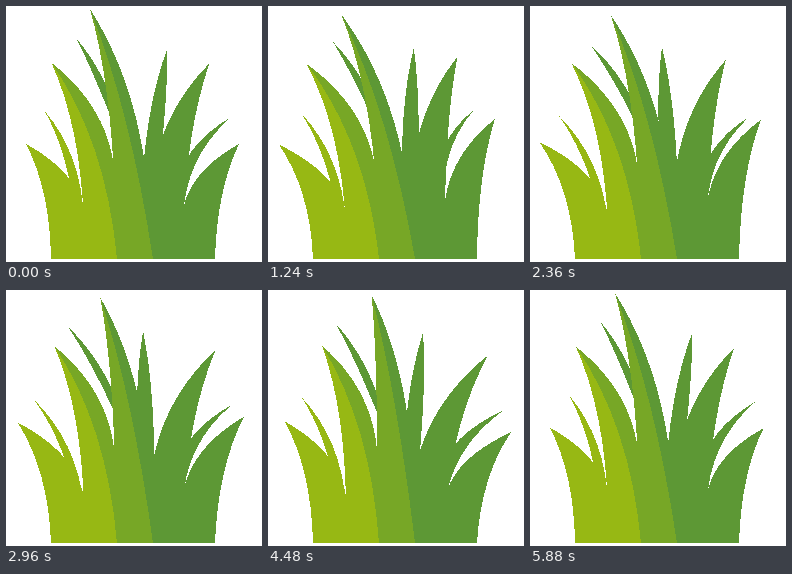
Write an HTML page that moves like this. It is 256 by 256 pixels and loops after 5.96 s.

```html
<!DOCTYPE html>
<html>
<head>
<meta charset="utf-8">
<style>
html, body { margin: 0; width: 100%; height: 100%; overflow: hidden; background: #fff; }
svg { display: block; width: 100vw; height: 100vh; }
</style>
</head>
<body>
<svg id="stage" viewBox="0 0 256 256" shape-rendering="crispEdges"></svg>
<script>
const LOOP = 5960, STEP = 40, GROUND = 253;
const LEFT = 1800, RIGHT = 3780; // when the gust turns
const GREEN = '#5d9835', MID = '#77a726', LIME = '#97b814';

// keys: turning points of the tip (time, x, y), joined at constant speed.
// Edges: foot x, foot y, x the edge bends towards.
// give: how much of the tip's sway the bend follows.
const back = {
  keys: [[2330, 60, 38.5], [5600, 72, 31.5]], give: .4,
  left: [112, 130, 90], right: [115, 122, 101], floor: 130
};
const thinRight = {
  keys: [[2440, 131, 41], [5490, 167, 43]], give: .5,
  left: [135, 200, 138], right: [148, 200, 162]
};
const right = {
  keys: [[LEFT, 183, 48], [RIGHT, 228, 69]], give: .3,
  left: [143, 210, 143], right: [177, 220, 181]
};
const side = {
  keys: [[0, 225, 111], [1200, 205, 104], [4100, 239, 122]], give: .5,
  left: [170, 185, 175], right: [177, 215, 178]
};
const farRight = {
  keys: [[0, 233, 138], [LEFT, 224, 102], [RIGHT, 248, 144]], give: .2,
  left: [176, 220, 174], right: [209, 253, 211]
};
const tall = {
  keys: [[0, 84, 3], [LEFT, 68, 10], [RIGHT, 113, 6]], give: .25,
  left: [109, 190, 105], right: [144, 250, 147], inner: [147, 253, 124]
};
const thinLeft = {
  keys: [[2700, 27, 110], [5900, 39, 105]], give: .5,
  left: [68, 200, 60], right: [78, 215, 76]
};
const left = {
  keys: [[LEFT, 35, 58], [RIGHT, 58, 55]], give: .3,
  left: [78, 220, 75], right: [109, 190, 113], inner: [111, 253, 100]
};
const farLeft = {
  keys: [[0, 20, 138], [LEFT, 7, 139], [RIGHT, 15, 128]], give: .2,
  left: [45, 253, 44], right: [79, 220, 80]
};

// Back to front
const layers = [
  [back, GREEN], [thinRight, GREEN], [right, GREEN], [side, GREEN], [farRight, GREEN],
  [tall, GREEN], [tall, MID, 'inner'],
  [thinLeft, LIME], [left, MID], [farLeft, LIME], [left, LIME, 'inner']
].map(([blade, fill, edge = 'right']) => {
  const path = document.createElementNS('http://www.w3.org/2000/svg', 'path');
  path.setAttribute('fill', fill);
  stage.append(path);
  return { blade, edge, path };
});

function tipAt(keys, t) {
  const next = keys.findIndex(([time]) => time > t);
  const b = keys[Math.max(next, 0)];
  const a = keys.at(next > 0 ? next - 1 : -1);
  const since = (t - a[0] + LOOP) % LOOP, span = (b[0] - a[0] + LOOP) % LOOP;
  return [1, 2].map(i => a[i] + (b[i] - a[i]) * since / span);
}

function outline(blade, edge, t) {
  const { keys, give, floor = GROUND } = blade;
  const [x, y] = tipAt(keys, t), dx = x - tipAt(keys, 0)[0];
  const bend = ([, footY, bendX]) => `${bendX + give * dx} ${y + .4 * (footY - y)}`;
  const l = blade.left, r = blade[edge];
  return `M${x} ${y}Q${bend(r)} ${r[0]} ${r[1]}V${floor}H${l[0]}V${l[1]}Q${bend(l)} ${x} ${y}Z`;
}

function draw() {
  const t = Math.floor(performance.now() % LOOP / STEP) * STEP;
  for (const { blade, edge, path } of layers) path.setAttribute('d', outline(blade, edge, t));
  requestAnimationFrame(draw);
}
draw();
</script>
</body>
</html>
```
